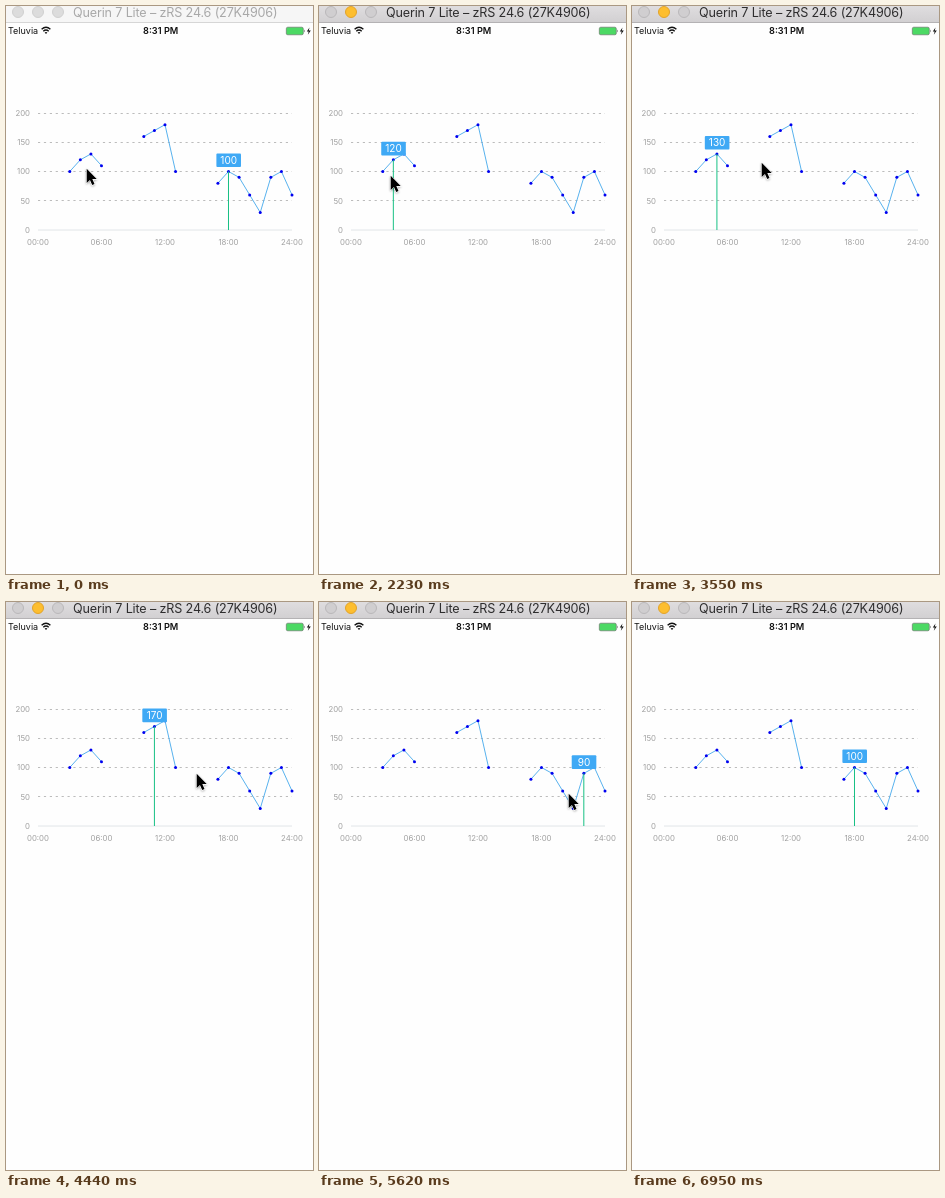
An HTML page that plays this animation: 307x568 px, repeating every 7750 ms.

```html
<!DOCTYPE html>
<html lang="en">
<head>
<meta charset="utf-8">
<title>Chart marker</title>
<style>
  html, body { margin: 0; width: 100%; height: 100%; overflow: hidden; background: #fefefe; }
  svg { display: block; width: 307px; height: 568px; font-family: Inter, Roboto, sans-serif; }
  #bar { fill: #f6f6f6; }
  #edge { fill: #d6d6d6; }
  #title { font-size: 12.6px; letter-spacing: -.15px; fill: #a8a8a8; }
  .button { fill: #dcdcdc; stroke: #d0d0d0; }
  .active #bar { fill: url(#chrome); }
  .active #edge { fill: #b4b2b4; }
  .active #title { fill: #2e2d2e; }
  .active .button { fill: #d0ced0; stroke: #bab8ba; }
  .active .button.mid { fill: #fdbe2f; stroke: #e2a32a; }
  .axis { font-size: 7.8px; fill: #a0a0a0; }
  .grid { stroke: #bcbcbc; stroke-dasharray: 2.2 3.7; }
  .line { fill: none; stroke: #58b2ee; stroke-width: 1; }
  .dot { fill: #0000f0; }
  #value { font-size: 10px; fill: #fff; text-anchor: middle; }
</style>
</head>
<body>
<svg id="stage" viewBox="0 0 307 568">
  <defs>
    <linearGradient id="chrome" x2="0" y2="1">
      <stop stop-color="#dfdddf"/><stop offset="1" stop-color="#d2d0d2"/>
    </linearGradient>
    <filter id="shade" x="-50%" y="-50%" width="200%" height="200%">
      <feDropShadow dx="0" dy="1" stdDeviation=".8" flood-opacity=".35"/>
    </filter>
  </defs>
  <rect width="307" height="568" fill="#fefefe"/>
  <rect id="bar" width="307" height="16"/>
  <rect id="edge" y="16" width="307" height="1"/>
  <circle class="button" cx="12" cy="6" r="5.5"/>
  <circle class="button mid" cx="32" cy="6" r="5.5"/>
  <circle class="button" cx="52" cy="6" r="5.5"/>
  <text id="title" x="67" y="11">Querin 7 Lite – zRS 24.6 (27K4906)</text>

  <text x="2" y="28" font-size="9" fill="#111">Teluvia</text>
  <g fill="none" stroke="#111" stroke-width="1.4">
    <path d="M35.6 23.2Q40 19.2 44.4 23.2M37.3 25.2Q40 22.8 42.7 25.2"/>
    <path d="M40 28L38.6 26.5Q40 25.4 41.4 26.5Z" fill="#111" stroke="none"/>
  </g>
  <text x="154.7" y="28" font-size="9.2" font-weight="600" text-anchor="middle" fill="#111">8:31 PM</text>
  <rect x="280.3" y="21.2" width="17" height="7.6" rx="1.5" fill="#4cd964" stroke="#666" stroke-width=".6"/>
  <path d="M298.2 23.5q1.5 1.5 0 3z" fill="#555"/>
  <path d="M303.5 21.5L300.8 25.5H302.7L301.8 28.8L304.8 24.5H302.8Z" fill="#111"/>

  <g id="chart"></g>
  <line id="stem" y2="224" stroke="#17c084"/>
  <rect id="tag" width="24.6" height="13.6" rx="1" fill="#3fa9f5"/>
  <text id="value"></text>
  <path id="cursor" d="M0 0V14.2L3.3 11.2L5.5 16.3L7.8 15.3L5.6 10.3H10Z"
    fill="#000" stroke="#fff" paint-order="stroke" filter="url(#shade)"/>
</svg>
<script>
const $ = id => document.getElementById(id);
const LOOP = 7750, FIRST = 1640, STEP = 147.5;
const runs = [
  { from: 3, values: [100, 120, 130, 110] },
  { from: 10, values: [160, 170, 180, 100] },
  { from: 17, values: [80, 100, 90, 60, 30, 90, 100, 60] }
];
const data = {};
const px = hour => 32 + hour * 10.583;
const py = value => 224 - value * 0.585;

function set(el, attrs) {
  for (const key in attrs) el.setAttribute(key, attrs[key]);
}

function add(tag, attrs, text = '') {
  const el = document.createElementNS('http://www.w3.org/2000/svg', tag);
  set(el, attrs);
  el.textContent = text;
  $('chart').append(el);
}

for (let v = 0; v <= 200; v += 50) {
  const y = v ? Math.floor(py(v)) + 0.5 : py(0);
  add('line', { class: 'grid', x1: 32, x2: 286, y1: y, y2: y,
    style: v ? '' : 'stroke: #e1e5e8; stroke-dasharray: none' });
  add('text', { class: 'axis', x: 24, y: py(v) + 2.8, 'text-anchor': 'end' }, v);
}
for (let h = 0; h <= 24; h += 6) {
  add('text', { class: 'axis', x: px(h), y: 239, 'text-anchor': 'middle' },
    String(h).padStart(2, '0') + ':00');
}
for (const { from, values } of runs) {
  const points = values.map((v, i) => [px(from + i), py(v)]);
  add('polyline', { class: 'line', points: points.join(' ') });
  points.forEach(([cx, cy]) => add('circle', { class: 'dot', cx, cy, r: 1.5 }));
  values.forEach((v, i) => data[from + i] = v);
}

// Key points by step: the marker's hour, and the cursor's place
const markerPath = [
  [2, 18], [3, 4], [6, 3], [8, 3], [10, 6], [13, 5], [15, 5],
  [16, 10], [19, 11], [20, 13], [21, 17], [24, 18], [28, 23], [31, 23], [36, 18]
];
const cursorPath = [
  [-1, 80, 162], [0, 72, 158], [4, 71, 169], [7, 63, 171], [13, 142, 153],
  [15, 142, 153], [24, 249, 194], [31, 249, 188], [36, 240, 190]
];

// Linear between neighbouring keys, held at both ends
function along(path, n) {
  const i = path.findIndex(k => k[0] >= n);
  if (i < 0) return path.at(-1).slice(1);
  const b = path[i], a = path[i - 1] || b;
  const f = a === b ? 1 : (n - a[0]) / (b[0] - a[0]);
  return b.slice(1).map((v, j) => a[j + 1] + (v - a[j + 1]) * f);
}

function draw(t) {
  const n = Math.floor((t - FIRST + 6) / STEP);
  const hour = Math.round(along(markerPath, n)[0]);
  const [cx, cy] = along(cursorPath, n).map(Math.round);
  const x = px(hour), y = py(data[hour]);
  $('stage').classList.toggle('active', n >= 2);
  set($('stem'), { x1: x, x2: x, y1: y });
  set($('tag'), { x: x - 12.1, y: y - 18 });
  set($('value'), { x: x + 0.2, y: y - 7.5 });
  $('value').textContent = data[hour];
  const shown = t < 750 || (n >= 0 && n < 36);
  set($('cursor'), { visibility: shown ? 'visible' : 'hidden',
    transform: `translate(${cx + 0.7} ${cy + 0.8})` });
}

const start = performance.now();
function tick() {
  draw((performance.now() - start) % LOOP);
  requestAnimationFrame(tick);
}
draw(0);
requestAnimationFrame(tick);
</script>
</body>
</html>
```
